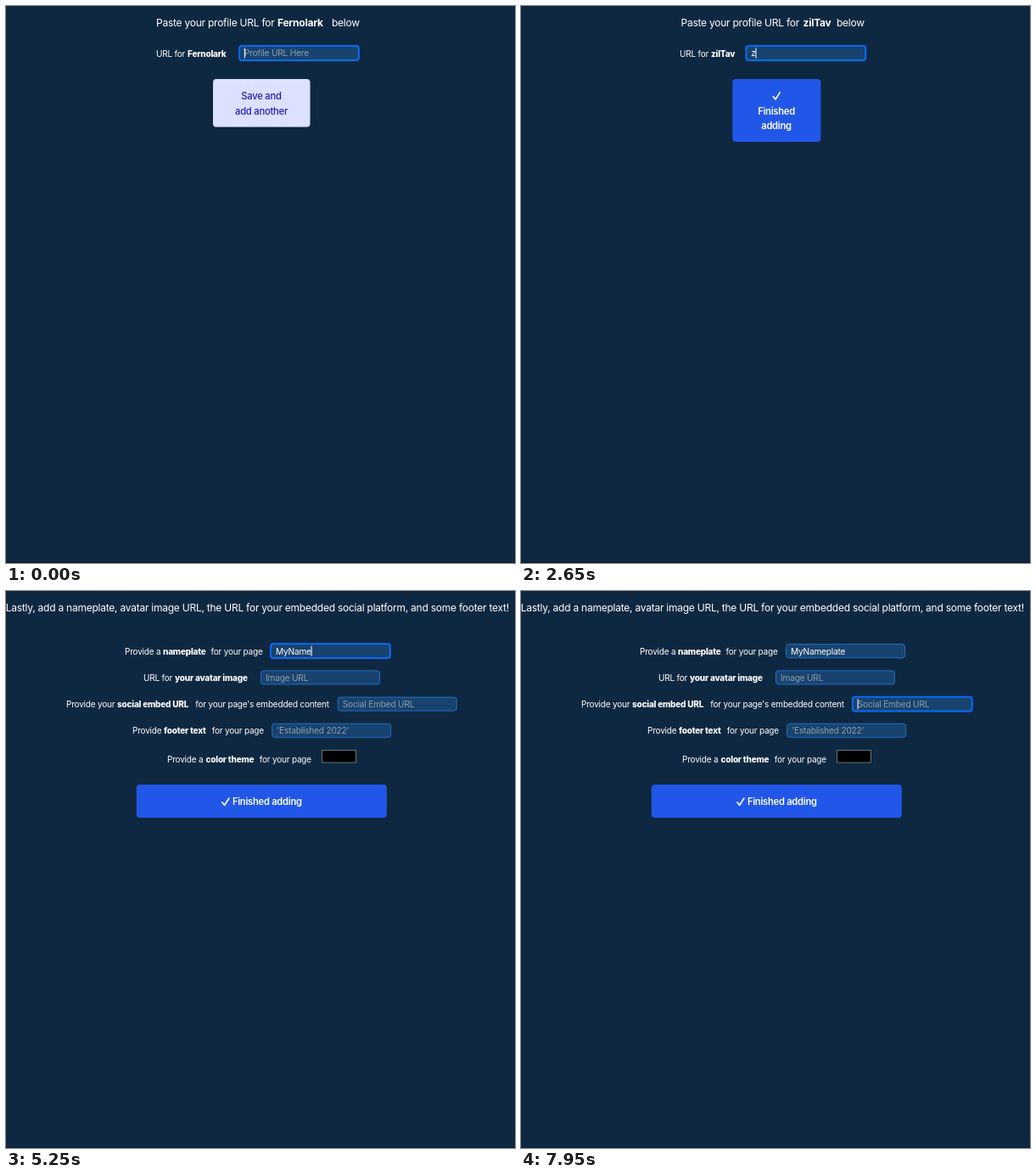
An HTML page that plays this animation: 600 by 656 pixels, repeating every 8000 ms.

```html
<!DOCTYPE html>
<html lang="en">
<head>
<meta charset="utf-8">
<title>Profile links form</title>
<style>
  html, body { margin: 0; width: 100%; height: 100%; overflow: hidden; background: #0f2841; }
  svg { display: block; width: 600px; height: 656px; }
  text { font-family: Inter, "Open Sans", sans-serif; letter-spacing: -.02em; fill: #fff; white-space: pre; }
  .head { font-size: 12px; }
  .head.b { font-weight: 700; }
  .label, .value, .hint { font-size: 10px; }
  .label.b { font-weight: 800; }
  .value, .hint { font-size: 10.15px; }
  .hint { fill: #8f9cab; }
  .btn { font-size: 11.2px; font-weight: 500; text-anchor: middle; }
  .ink { fill: #2a18b4; }
  .strong { font-weight: 600; font-size: 11.1px; }
  .mid { text-anchor: middle; }
  .box { fill: #18436f; stroke: #1f6fc4; stroke-width: 1; }
  .focus .box { stroke: #0a6bf5; stroke-width: 2; }
  .caret { fill: #fff; }
  .tick { fill: none; stroke: #fff; stroke-width: 1.7; stroke-linecap: round; stroke-linejoin: round; }
</style>
</head>
<body>
<svg id="stage" viewBox="0 0 600 656"></svg>
<script>
const LOOP = 8000, BLINK = 200;
const stage = document.getElementById('stage');

function add(parent, tag, attrs, content) {
  const el = document.createElementNS('http://www.w3.org/2000/svg', tag);
  for (const k in attrs) el.setAttribute(k, attrs[k]);
  if (content) el.textContent = content;
  parent.append(el);
  return el;
}
const text = (g, cls, x, y, s) => add(g, 'text', { class: cls, x, y }, s);
const rect = (g, x, y, width, height, fill, rx = 0) => add(g, 'rect', { x, y, width, height, fill, rx });
const tick = (g, x, y) => add(g, 'path', { class: 'tick', d: `M${x} ${y + 5.2}l2.6 3.2 5.2-8` });
const show = (el, on) => el.setAttribute('visibility', on ? 'visible' : 'hidden');

// Three consecutive runs, the middle one bold
function phrase(g, cls, y, [x1, a], [x2, b], [x3, c]) {
  text(g, cls, x1, y, a);
  text(g, cls + ' b', x2, y, b);
  if (c) text(g, cls, x3, y, c);
}

const pages = [], fields = [];

function page(from, to) {
  const el = add(stage, 'g', {});
  pages.push({ el, from, to });
  return el;
}

// opts: from/to focus span, word, start, step, erase (time of first deletion), blinkFrom
function field(g, x, y, hint, opts = {}) {
  const el = add(g, 'g', {});
  const box = add(el, 'rect', { class: 'box', x, y, width: 140, height: 16, rx: 3 });
  fields.push({
    el, box, x, y, ...opts,
    hint: text(el, 'hint', x + 5.5, y + 11.8, hint),
    value: text(el, 'value', x + 5.5, y + 11.8, ''),
    caret: add(el, 'rect', { class: 'caret', y: y + 2, width: 1, height: 12 })
  });
}

function profilePage(span, name, head, label, fieldX, opts) {
  const g = page(...span);
  phrase(g, 'head', 23.7, [head[0], 'Paste your profile URL for'], [head[1], name], [head[2], 'below']);
  phrase(g, 'label', 59.5, [label[0], 'URL for'], [label[1], name], [0, '']);
  field(g, fieldX, 47.5, 'Profile URL Here', { from: span[0], to: span[1], ...opts });
  return g;
}

function saveButton(g, x, w) {
  rect(g, x, 86, w, 56.5, '#dbe1ff', 4);
  text(g, 'btn ink', 301, 109.7, 'Save and');
  text(g, 'btn ink', 301, 127.5, 'add another');
}

rect(stage, 0, 0, 600, 656, '#0f2841');
rect(stage, 0, 655, 600, 1, '#0b1d31');

saveButton(profilePage([0, 900], 'Fernolark', [177, 320, 384], [177, 214], 275.5,
  { word: 'fernolark', start: 50, step: 75 }), 244, 114.5);

saveButton(profilePage([900, 2250], 'Tunepebble', [171.5, 315, 389], [172.5, 209.5], 280,
  { word: 'tunepebble', start: 1100, step: 72, blinkFrom: 850 }), 241, 120.5);

const third = profilePage([2250, 4300], 'zilTav', [188.5, 332.5, 372], [187, 224], 265.8,
  { word: 'ziltavo', start: 2600, step: 75 });
rect(third, 249.3, 86, 104, 74, '#2157e8', 4);
tick(third, 297.4, 101.5);
text(third, 'btn strong', 301, 127.5, 'Finished');
text(third, 'btn strong', 301, 145.2, 'adding');

const last = page(4300, LOOP);
text(last, 'head mid', 296.3, 23.7,
  'Lastly, add a nameplate, avatar image URL, the URL for your embedded social platform, and some footer text!');
phrase(last, 'label', 74.5, [140, 'Provide a'], [185, 'nameplate'], [241.5, 'for your page']);
phrase(last, 'label', 105.5, [162, 'URL for'], [199, 'your avatar image'], [0, '']);
phrase(last, 'label', 136.8, [71, 'Provide your'], [131, 'social embed URL'], [223.3, "for your page's embedded content"]);
phrase(last, 'label', 168, [149, 'Provide'], [186, 'footer text'], [242.8, 'for your page']);
phrase(last, 'label', 201.8, [190, 'Provide a'], [235.5, 'color theme'], [298.8, 'for your page']);
field(last, 312.5, 62.7, 'Your nameplate here', { from: 4700, to: 5650, word: 'MyNameplate', start: 4900, step: 60 });
field(last, 300.5, 93.9, 'Image URL', { from: 5650, to: 7150, word: 'myimage', start: 6250, step: 60, erase: 6750 });
field(last, 391.3, 125.1, 'Social Embed URL', { from: 7150, to: LOOP });
field(last, 313.7, 156.3, "'Established 2022'");
add(last, 'rect', { x: 372.5, y: 187.5, width: 40, height: 14.5, fill: '#000', stroke: '#6d7276' });
rect(last, 153.8, 228, 295, 39, '#2157e8', 4);
tick(last, 255, 243.8);
text(last, 'btn strong', 307.8, 251.9, 'Finished adding');

const pointer = add(last, 'path', {
  d: 'M300.5 51.5v18.2l4.2-3.9 3.3 7.4 3-1.4-3.2-7.1h5.7z',
  fill: '#000', stroke: '#fff', 'stroke-width': 1.2, 'stroke-linejoin': 'round'
});

// Number of characters in a field and the moment of its latest key
function typed(f, t) {
  if (!f.word || t < f.start) return [0, f.blinkFrom ?? f.from];
  const n = Math.min(f.word.length, Math.floor((t - f.start) / f.step) + 1);
  if (!f.erase || t < f.erase) return [n, f.start + (n - 1) * f.step];
  const gone = Math.min(n, Math.floor((t - f.erase) / 45) + 1);
  return [n - gone, f.erase + (gone - 1) * 45];
}

function drawField(f, t) {
  const focus = t >= f.from && t < f.to;
  const grow = focus ? .4 : 0;
  const [n, key] = typed(f, t);
  f.el.setAttribute('class', focus ? 'focus' : '');
  f.box.setAttribute('x', f.x - grow);
  f.box.setAttribute('y', f.y - grow);
  f.box.setAttribute('width', 140 + 2 * grow);
  f.box.setAttribute('height', 16 + 2 * grow);
  f.hint.style.display = n ? 'none' : '';
  f.value.textContent = n ? f.word.slice(0, n) : '';
  f.caret.setAttribute('x', f.x + 5.3 + (n ? f.value.getComputedTextLength() : 0));
  f.caret.style.display = focus && Math.floor((t - key) / BLINK) % 2 === 0 ? '' : 'none';
}

function draw(now) {
  const t = now % LOOP;
  for (const p of pages) p.el.style.display = t >= p.from && t < p.to ? '' : 'none';
  fields.forEach(f => drawField(f, t));
  show(pointer, t < 4650);
  requestAnimationFrame(draw);
}

const begin = performance.now();
const frame = now => draw(Math.max(0, now - begin));
function tickLoop(now) {
  const t = Math.max(0, now - begin) % LOOP;
  for (const p of pages) p.el.style.display = t >= p.from && t < p.to ? '' : 'none';
  fields.forEach(f => drawField(f, t));
  pointer.style.display = t < 4650 ? '' : 'none';
  requestAnimationFrame(tickLoop);
}
tickLoop(begin);
</script>
</body>
</html>
```
